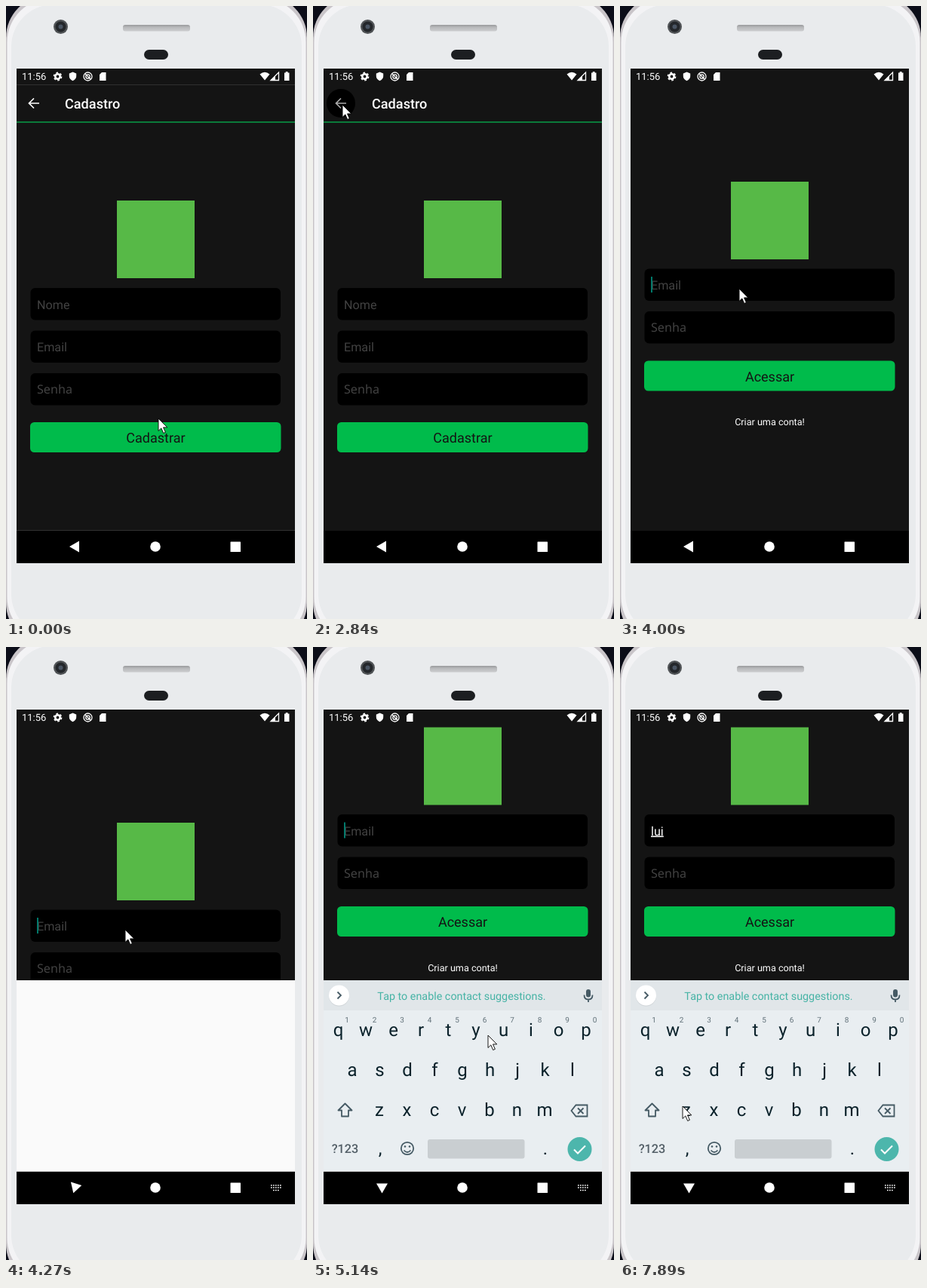
An HTML page for the animation above (8000 ms loop, 399x813 px).

```html
<!DOCTYPE html>
<html lang="pt">
<head>
<meta charset="utf-8">
<style>
  html, body { margin: 0; height: 100%; overflow: hidden; background: #0b0d18; }
  svg { display: block; width: 100vw; height: 100vh; font-family: Roboto, sans-serif; text-rendering: geometricPrecision; }
  .hint { font-size: 16.16px; fill: #424242; }
  .secret { font-family: "Noto Sans", "Open Sans", sans-serif; }
  .label { font-size: 18px; fill: #141414; text-anchor: middle; }
  .line { fill: none; stroke: #455a64; stroke-width: 1.8; }
  #letters { font-size: 24px; fill: #0b222b; text-anchor: middle; }
  #letters .digit { font-size: 10px; fill: #607078; }
</style>
</head>
<body>
<svg viewBox="0 0 399 813">
  <defs>
    <linearGradient id="slot" x2="0" y2="1">
      <stop stop-color="#98999b"/><stop offset=".4" stop-color="#b9babc"/><stop offset="1" stop-color="#cccdcf"/>
    </linearGradient>
    <clipPath id="screen"><rect x="14" y="83" width="369" height="613"/></clipPath>
    <clipPath id="aboveKeys"><rect id="visible" x="14" y="83" width="369" height="613"/></clipPath>
    <rect id="field" x="32.5" width="331.5" height="42.5" rx="6"/>
    <rect id="button" x="32" width="332.5" height="40" rx="5.5" fill="#00bb4b"/>
    <rect id="badge" x="147" width="103" height="103" fill="#57b947"/>
  </defs>

  <!-- phone body -->
  <rect x="0" y="-14" width="399" height="862" rx="56" fill="#c9c5c9"/>
  <rect x="1.5" y="-10" width="396" height="852" rx="58" fill="#f3f3f5"/>
  <rect x="7" y="-2" width="385" height="838" rx="56" fill="#e9ebed"/>
  <circle cx="72.5" cy="27.5" r="9.5" fill="#505356"/>
  <circle cx="72.5" cy="27.5" r="7" fill="#24272b"/>
  <circle cx="72.5" cy="27.5" r="3" fill="#4a5563"/>
  <rect x="155" y="25" width="89" height="8.5" rx="3" fill="url(#slot)"/>
  <rect x="183" y="58" width="32" height="13" rx="6.5" fill="#1c1e21"/>
  <rect x="14" y="83" width="369" height="656" fill="#141414"/>

  <!-- status bar -->
  <g fill="#fff">
    <text x="21" y="98" font-size="13">11:56</text>
    <circle cx="68.5" cy="93.5" r="3.2" fill="none" stroke="#fff" stroke-width="2.6"/>
    <circle cx="68.5" cy="93.5" r="5" fill="none" stroke="#fff" stroke-width="1.8" stroke-dasharray="2.6 2.636"/>
    <path d="M88.5 87.5l4.7 2v3.5q0 4-4.7 6.3q-4.7-2.3-4.7-6.3v-3.5z"/>
    <g fill="none" stroke="#fff" stroke-width="1.3">
      <circle cx="108.5" cy="93.5" r="5.5"/><circle cx="108.5" cy="93.5" r="2.7"/>
      <path d="M105 90l7 7"/>
    </g>
    <path d="M127 88h5.5v11h-8.500v-8z"/>
    <path d="M336.5 90.5q6.5-5.5 13 0l-6.5 8z"/>
    <path d="M361.5 88v10.5h-10.5z" fill="none" stroke="#fff" stroke-width="1.3"/>
    <path d="M357 92.5v6h-6z"/>
    <path d="M369 88.5h1.8v-1.5h2.7v1.5h2v10.5h-6.5z"/>
  </g>

  <g id="signUp" clip-path="url(#screen)">
    <rect id="topLine" x="14" y="104" width="369" height="1" fill="#303030"/>
    <rect x="14" y="153" width="369" height="2" fill="#0b7a3a"/>
    <circle id="ripple" cx="37" cy="129" fill="#000"/>
    <path id="back" d="M44 129H31M37 122.5l-6.5 6.5 6.5 6.5" fill="none" stroke-width="1.7"/>
    <text x="78" y="136" font-size="18.1" font-weight="500" fill="#fff">Cadastro</text>
    <use href="#badge" y="258"/>
    <use href="#field" y="374"/><text class="hint" x="41" y="401.5">Nome</text>
    <use href="#field" y="430.5"/><text class="hint" x="41" y="457.5">Email</text>
    <use href="#field" y="487"/><text class="hint secret" x="41" y="514">Senha</text>
    <use href="#button" y="552"/><text class="label" x="198.5" y="579">Cadastrar</text>
    <rect id="bottomLine" x="14" y="695" width="369" height="1" fill="#303030"/>
  </g>

  <g clip-path="url(#aboveKeys)">
    <g id="login">
      <use href="#badge" y="233"/>
      <use href="#field" y="348.5"/><text id="email" class="hint" x="41" y="376"></text>
      <rect id="caret" y="359" width="2" height="21" fill="#00796b"/>
      <use href="#field" y="405"/><text class="hint secret" x="41" y="432">Senha</text>
      <use href="#button" y="470.5"/><text class="label" x="198.5" y="497.5">Acessar</text>
      <text x="198.5" y="556" font-size="12.6" fill="#fff" text-anchor="middle">Criar uma conta!</text>
    </g>
  </g>

  <g id="panel">
    <rect x="14" y="442" width="369" height="254" fill="#fafafa"/>
    <g id="keyboard">
      <rect x="14" y="442" width="369" height="254" fill="#e9eef1"/>
      <rect x="14" y="442" width="369" height="40" fill="#e1e6e9"/>
      <circle cx="34.5" cy="463" r="13.5" fill="#cfd4d7"/>
      <circle cx="34.5" cy="462" r="13.5" fill="#fff"/>
      <path class="line" d="M32.5 457.5l4.5 4.5-4.5 4.5"/>
      <text x="197" y="468" font-size="14.35" fill="#46b3a5" text-anchor="middle">Tap to enable contact suggestions.</text>
      <rect x="362" y="454" width="6" height="10.5" rx="3" fill="#455a64"/>
      <path class="line" d="M359.5 461.5q0 6 5.5 6t5.5-6M365 467v4"/>
      <g id="letters"></g>
      <path class="line" d="M42.5 605.5l9 9h-4.5v8h-9v-8h-4.5z" stroke-linejoin="round"/>
      <path class="line" d="M348.5 607.5h15v15h-15l-6-7.5zM351 611.5l7.5 7.5M358.5 611.5l-7.5 7.5"/>
      <text x="42.5" y="671" font-size="16.3" font-weight="500" fill="#546068" text-anchor="middle">?123</text>
      <circle class="line" cx="125" cy="665" r="8.2"/>
      <path class="line" d="M120.5 667.5q4.5 5 9 0"/>
      <circle cx="122" cy="662.5" r="1.3" fill="#455a64"/><circle cx="128" cy="662.5" r="1.3" fill="#455a64"/>
      <rect x="152" y="653" width="128.5" height="25.5" rx="3" fill="#c9ced1"/>
      <circle cx="353.5" cy="666" r="16" fill="#4db6ac"/>
      <path d="M346 666.5l5 5 10-10" fill="none" stroke="#fff" stroke-width="2"/>
    </g>
    <rect x="14" y="695" width="369" height="1" fill="#c8c8c8"/>
  </g>

  <!-- navigation bar -->
  <rect x="14" y="696" width="369" height="43"/>
  <g fill="#fff">
    <path id="navBack" d="M84 717l13-7.5v15z"/>
    <circle cx="198" cy="717" r="6.8"/>
    <rect x="297.5" y="710.5" width="13.5" height="13.5" rx=".6"/>
    <path id="navKeys" d="M351 714h14M351 717h14M354 720.5h8" stroke="#fff" stroke-width="1.6" stroke-dasharray="1.7 1.3"/>
  </g>

  <path id="pointer" d="M0 0v16.5l3.8-3.6 2.9 6.6 2.7-1.2-2.9-6.4h5.3z" fill="#fff" stroke="#000" stroke-width=".9"/>
</svg>
<script>
const LOOP = 8000, STEP = 140.8;
const el = id => document.getElementById(id);
const show = (id, on) => el(id).setAttribute('visibility', on ? 'visible' : 'hidden');
const set = (id, attrs) => Object.entries(attrs).forEach(([k, v]) => el(id).setAttribute(k, v));

// Keyboard rows: letters, first x, baseline
const key = (text, x, y, cls = '') => `<text x="${x}" y="${y}" class="${cls}">${text}</text>`;
const row = (chars, x, y) => [...chars].map((c, i) => key(c, x + 36.5 * i, y)).join('');
el('letters').innerHTML = row('qwertyuiop', 33.5, 516) + row('asdfghjkl', 52, 569) +
  row('zxcvbnm', 88, 621.5) + key(',', 89, 673) + key('.', 308, 673) +
  [...'1234567890'].map((c, i) => key(c, 45 + 36.5 * i, 498, 'digit')).join('');

// Pointer path: step, x, y
const path = [
  [0, 202, 547], [2, 202, 547], [6, 65, 389], [10, 151, 505], [11, 151, 505],
  [19, 39, 131], [22, 39, 131], [26, 158, 375], [33, 158, 375], [36, 232, 515],
  [39, 341, 576], [41, 331, 562], [42, 331, 562], [45, 256, 513], [46, 256, 513],
  [49, 290, 508], [50, 290, 508], [56, 83, 609]
];
function pointerAt(n) {
  const i = Math.max(1, path.findIndex(p => p[0] >= n));
  const [a, x0, y0] = path[i - 1], [b, x1, y1] = path[i];
  const k = (n - a) / (b - a), e = k * k * (3 - 2 * k);
  return [x0 + (x1 - x0) * e, y0 + (y1 - y0) * e];
}

const caretOn = [[28, 31], [35, 38], [42, 44], [47, 49], [50, 53]];

function draw(ms) {
  const n = Math.min(56, Math.floor((ms + 3) / STEP));
  const signUp = n < 22, pressed = n >= 19, keys = n >= 30, raised = n >= 31;

  show('signUp', signUp);
  show('topLine', n < 1);
  show('bottomLine', n < 1);
  set('ripple', { r: !pressed ? 0 : n < 20 ? 14 : 19 });
  set('back', { stroke: n >= 20 ? '#aaa' : '#fff' });

  show('login', !signUp);
  set('login', { transform: `translate(0 ${raised ? -126.5 : 0})` });
  set('visible', { height: keys ? 359 : 613 });
  const typed = n < 42 ? '' : n < 47 ? 'l' : n < 50 ? 'lu' : 'lui';
  const email = el('email');
  email.textContent = typed || 'Email';
  email.style.fill = typed ? '#fff' : '';
  email.style.textDecoration = typed ? 'underline' : '';
  set('caret', { x: typed ? 41 + email.getComputedTextLength() : 41 });
  show('caret', caretOn.some(([a, b]) => n >= a && n <= b));

  show('panel', keys);
  show('keyboard', raised);
  show('navKeys', keys);
  set('navBack', { transform: `rotate(${raised ? -90 : keys ? -73 : 0} 91.5 717)` });
  set('pointer', { transform: `translate(${pointerAt(n)})` });
}

const start = performance.now();
(function tick() {
  draw((performance.now() - start) % LOOP);
  requestAnimationFrame(tick);
})();
</script>
</body>
</html>
```
